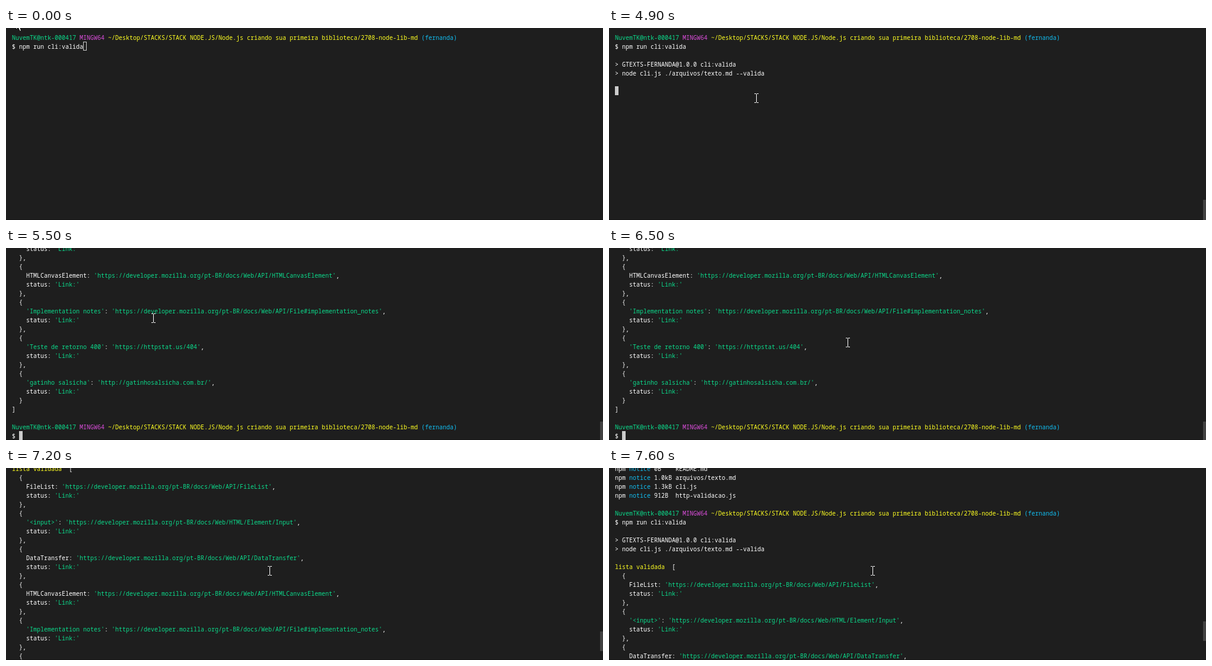
Recreate the animation shown at these times as an HTML page with a canvas. Size 1006 px wide and 323 px high, loop 8 s.

```html
<!DOCTYPE html>
<html lang="pt-BR">
<head>
<meta charset="utf-8">
<title>Terminal</title>
<style>
html, body { margin: 0; width: 100%; height: 100%; overflow: hidden; background: #1e1e1e; }
canvas { display: block; }
</style>
</head>
<body>
<canvas id="stage" width="1006" height="323"></canvas>
<script>
const ctx = document.getElementById('stage').getContext('2d');
const LOOP = 8000, CELL = 6, ROW = 15, ROWS = 22, LEFT = 10;
const WHITE = '#fff', GREEN = '#0cda8b', MAGENTA = '#dc4edc', YELLOW = '#ffff22', CYAN = '#12bdf0';

// A line is a list of [text, colour] spans.
const plain = text => [[text, WHITE]];
const quoted = text => text.split(/('[^']*')/).map(s => [s, s[0] === "'" ? GREEN : WHITE]);
const notice = text => [['npm ', WHITE], ['notice ', CYAN], [text, WHITE]];
const prompt = [
  ['NuvemTK@ntk-000417 ', GREEN],
  ['MINGW64 ', MAGENTA],
  ['~/Desktop/STACKS/STACK NODE.JS/Node.js criando sua primeira biblioteca/2708-node-lib-md ', YELLOW],
  ['(fernanda)', CYAN]
];

const mdn = 'https://developer.mozilla.org/pt-BR/docs/Web/';
const links = [
  ['FileList', mdn + 'API/FileList'],
  ["'<input>'", mdn + 'HTML/Element/Input'],
  ['DataTransfer', mdn + 'API/DataTransfer'],
  ['HTMLCanvasElement', mdn + 'API/HTMLCanvasElement'],
  ["'Implementation notes'", mdn + 'API/File#implementation_notes'],
  ["'Teste de retorno 400'", 'https://httpstat.us/404'],
  ["'gatinho salsicha'", 'http://gatinhosalsicha.com.br/']
];

const history = [
  notice('0B    README.md'),
  notice('1.0kB arquivos/texto.md'),
  notice('1.3kB cli.js'),
  notice('912B  http-validacao.js')
];
const command = [[], prompt, plain('$ npm run cli:valida')];
const banner = [
  [],
  plain('> GTEXTS-FERNANDA@1.0.0 cli:valida'),
  plain('> node cli.js ./arquivos/texto.md --valida'),
  []
];
const list = [
  [['lista validada  ', YELLOW], ['[', WHITE]],
  ...links.flatMap(([label, url], i) => [
    plain('  {'),
    quoted(`    ${label}: '${url}',`),
    quoted("    status: 'Link:'"),
    plain(i < links.length - 1 ? '  },' : '  }')
  ]),
  plain(']')
];
const lines = [...history, ...command, ...banner, ...list, [], prompt, plain('$ ')];

const entered = history.length + command.length;
const listStart = entered + banner.length;
const listEnd = listStart + list.length;

function cursorLine(t) {
  if (t < 1800) return entered - 1;
  if (t < 4900) return entered;
  if (t < 5200) return listStart;
  return t < 5500 ? listEnd : lines.length - 1;
}

// Each wheel notch scrolls back five and a half rows.
const notches = [6700, 6900, 7400, 7600];
const scrolledRows = t => Math.round(5.5 * notches.filter(n => n <= t).length);

// Mouse moves: start, end, dx, dy
const moves = [[0, 600, 139, 45], [700, 1000, 93, 87], [6100, 6600, 193, 51], [7100, 7200, 3, 4]];

function mouseAt(t) {
  let x = 16, y = -14;
  for (const [start, end, dx, dy] of moves) {
    const k = Math.min(1, Math.max(0, (t - start) / (end - start)));
    x += dx * k;
    y += dy * k;
  }
  return [Math.round(x), Math.round(y)];
}

function rect(x, y, w, h, colour) {
  ctx.fillStyle = colour;
  ctx.fillRect(x, y, w, h);
}

function drawLine(spans, baseline) {
  let x = LEFT;
  for (const [text, colour] of spans) {
    ctx.fillStyle = colour;
    ctx.fillText(text, x, baseline);
    x += text.length * CELL;
  }
}

function drawArrow(x, y) {
  ctx.fillStyle = '#fff';
  ctx.strokeStyle = '#000';
  const arrow = new Path2D(`M${x + .5} ${y + .5}v16l4-3 3 6 2-1-2-6h5z`);
  ctx.fill(arrow);
  ctx.stroke(arrow);
}

function drawBeam(x, y) {
  rect(x, y - 7, 1, 14, '#fff');
  for (const edge of [y - 8, y + 7]) {
    rect(x - 3, edge, 3, 1, '#fff');
    rect(x + 1, edge, 3, 1, '#fff');
  }
}

function draw(now) {
  const t = Math.floor(now % LOOP / 100) * 100;
  const current = cursorLine(t), back = scrolledRows(t);
  const top = Math.max(history.length, current - ROWS + 1) - back;
  const text = lines[current].map(span => span[0]).join('');
  const atInput = text.startsWith('$');

  rect(0, 0, 1006, 323, '#1e1e1e');
  rect(0, 322, 1006, 1, '#161616');

  ctx.font = '500 10px "Noto Sans Mono", "DejaVu Sans Mono", monospace';
  lines.slice(top, Math.min(top + ROWS, current + atInput))
    .forEach((line, i) => drawLine(line, 5 + ROW * i));

  const cx = LEFT + (atInput ? text.length * CELL : 0), cy = ROW * (current - top) - 7;
  if (t < 1800) {
    ctx.strokeStyle = '#ccc';
    ctx.strokeRect(cx + .5, cy + .5, CELL - 1, ROW - 1);
  } else {
    rect(cx, cy, CELL, ROW, '#ccc');
  }

  if (t >= 200) rect(1001, Math.round((t < 5200 ? 289 : 292) - 1.55 * back), 5, t < 5200 ? 34 : 33, '#424242');

  (t < 100 ? drawArrow : drawBeam)(...mouseAt(t));
}

const start = performance.now();
function tick() {
  draw(performance.now() - start);
  requestAnimationFrame(tick);
}
tick();
</script>
</body>
</html>
```
